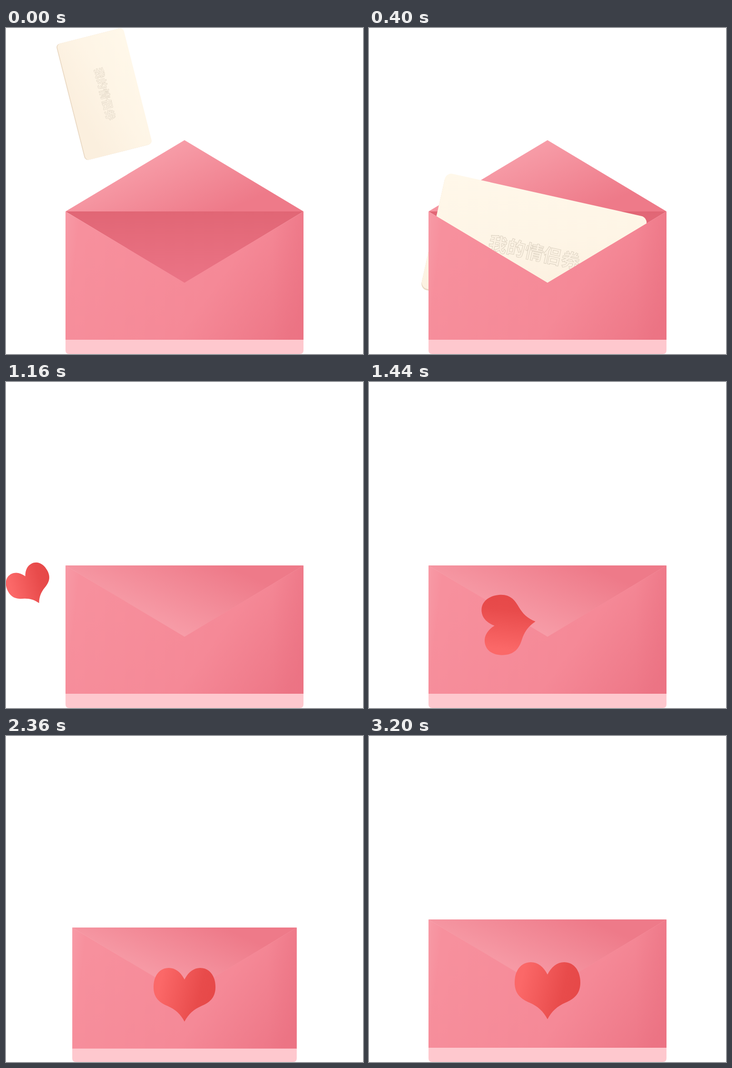
An HTML page that plays this animation: 750 by 686 pixels, repeating every 3.24 s.

```html
<!DOCTYPE html>
<html lang="zh">
<head>
<meta charset="utf-8">
<title>Envelope</title>
<style>
  html, body { margin: 0; width: 100%; height: 100%; overflow: hidden; background: #fff; }
  svg { display: block; width: 100%; height: 100%; }
  text { font: 700 39px "Noto Sans CJK SC", "Noto Sans CJK", sans-serif; }
</style>
</head>
<body>
<svg viewBox="0 0 750 686">
  <defs>
    <linearGradient id="insideFill" gradientUnits="userSpaceOnUse" x1="0" y1="386" x2="0" y2="536">
      <stop offset="0" stop-color="#e16675"/><stop offset="1" stop-color="#eb7486"/>
    </linearGradient>
    <linearGradient id="flapFill" gradientUnits="userSpaceOnUse" x1="-30" y1="-140" x2="40" y2="20">
      <stop offset="0" stop-color="#f79da8"/><stop offset="1" stop-color="#ee7a89"/>
    </linearGradient>
    <linearGradient id="frontFill" gradientUnits="userSpaceOnUse" x1="190" y1="400" x2="570" y2="680">
      <stop offset="0" stop-color="#f7909d"/><stop offset=".6" stop-color="#f58997"/><stop offset="1" stop-color="#ed7686"/>
    </linearGradient>
    <linearGradient id="leftGlow" gradientUnits="userSpaceOnUse" x1="125" y1="0" x2="205" y2="10">
      <stop offset="0" stop-color="#fff" stop-opacity=".22"/><stop offset="1" stop-color="#fff" stop-opacity="0"/>
    </linearGradient>
    <linearGradient id="rightShade" gradientUnits="userSpaceOnUse" x1="560" y1="0" x2="625" y2="0">
      <stop offset="0" stop-color="#ea6f80" stop-opacity="0"/><stop offset="1" stop-color="#ea6f80" stop-opacity=".45"/>
    </linearGradient>
    <linearGradient id="cardFill" x1="0" y1="0" x2=".5" y2="1">
      <stop offset="0" stop-color="#fff8ea"/><stop offset=".5" stop-color="#fef5e6"/><stop offset="1" stop-color="#fbefde"/>
    </linearGradient>
    <linearGradient id="heartFill" x1="0" y1=".3" x2="1" y2=".5">
      <stop offset=".1" stop-color="#fb6868"/><stop offset=".75" stop-color="#e84b4b"/><stop offset="1" stop-color="#e64848"/>
    </linearGradient>
    <path id="flap" d="M-250 0L0-150L250 0Z" fill="url(#flapFill)"/>
    <path id="front" d="M125 386L375 536L625 386V656.5H125Z"/>
  </defs>
  <g id="envelope">
    <path id="inside" d="M125 386H625L375 537Z"/>
    <use id="flapOpen" href="#flap"/>
    <g id="card">
      <rect x="-217" y="-121" width="434" height="248" rx="14" fill="#ead9c4"/>
      <rect x="-217" y="-124" width="434" height="248" rx="14" fill="url(#cardFill)"/>
      <text y="14" text-anchor="middle" fill="#fbf1e2" stroke="#d8cebd" stroke-width=".9">我的情侣券</text>
    </g>
    <use href="#front" fill="url(#frontFill)"/>
    <use href="#front" fill="url(#leftGlow)"/>
    <use href="#front" fill="url(#rightShade)"/>
    <path d="M125 656H625V678Q625 686 617 686H133Q125 686 125 678Z" fill="#fec8ce"/>
    <use id="flapShut" href="#flap"/>
    <path id="heart" fill="url(#heartFill)"
      d="M0-34C-8-50-20-60-35-60C-56-60-69-42-69-17C-69 8-54 18-38 25C-20 33-9 43 0 60C9 43 20 33 38 25C54 18 69 8 69-17C69-42 56-60 35-60C20-60 8-50 0-34Z"/>
  </g>
</svg>
<script>
const LOOP = 3240, STEP = 40;
const el = id => document.getElementById(id);
const part = (t, from, to) => Math.min(1, Math.max(0, (t - from) / (to - from)));
const mix = (a, b, p) => a + (b - a) * p;
const show = (id, on) => el(id).setAttribute("visibility", on ? "visible" : "hidden");

function place(id, x, y, turn, sx, sy = sx) {
  el(id).setAttribute("transform", `translate(${x} ${y}) rotate(${turn}) scale(${sx} ${sy})`);
}

function drawCard(t) {
  const p = part(t, 0, 480);
  const size = mix(0.581, 1, part(t, 0, 360) ** 2.78);
  place("card", mix(207, 375, p), mix(139, 539, p), mix(75.8, 0, p), size);
  show("card", t < 880);
}

// The flap turns about its hinge, seen from 400 px away.
function drawFlap(t) {
  const angle = Math.PI * part(t, 560, 880) ** 4.47;
  const height = Math.cos(angle) / (1 - 0.375 * Math.sin(angle));
  const shut = height < 0;
  const id = shut ? "flapShut" : "flapOpen";
  place(id, 375, 386, 0, 1, height);
  show("flapOpen", !shut);
  show("flapShut", shut);
  el("inside").setAttribute("fill", t < 880 ? "url(#insideFill)" : "#f58c99");
}

function drawHeart(t) {
  const p = 1 - (1 - part(t, 1040, 1600)) ** 1.38;
  place("heart", mix(-77, 375, p), mix(387, 536, p), mix(-540, 0, p), mix(0.55, 1, p));
  show("heart", t > 1040);
}

function drawPulse(t) {
  const p = t < 2620 ? part(t, 2000, 2620) : 1 - part(t, 2620, 3200);
  const eased = mix(p, p * p * (3 - 2 * p), 0.3);
  const s = 1 - 0.096 * eased;
  el("envelope").setAttribute("transform", `translate(375 686) scale(${s}) translate(-375 -686)`);
}

function draw(t) {
  drawCard(t);
  drawFlap(t);
  drawHeart(t);
  drawPulse(t);
}

let start;
function tick(now) {
  start ??= now;
  const t = (now - start) % LOOP;
  draw(Math.floor(t / STEP) * STEP);
  requestAnimationFrame(tick);
}
draw(0);
requestAnimationFrame(tick);
</script>
</body>
</html>
```
